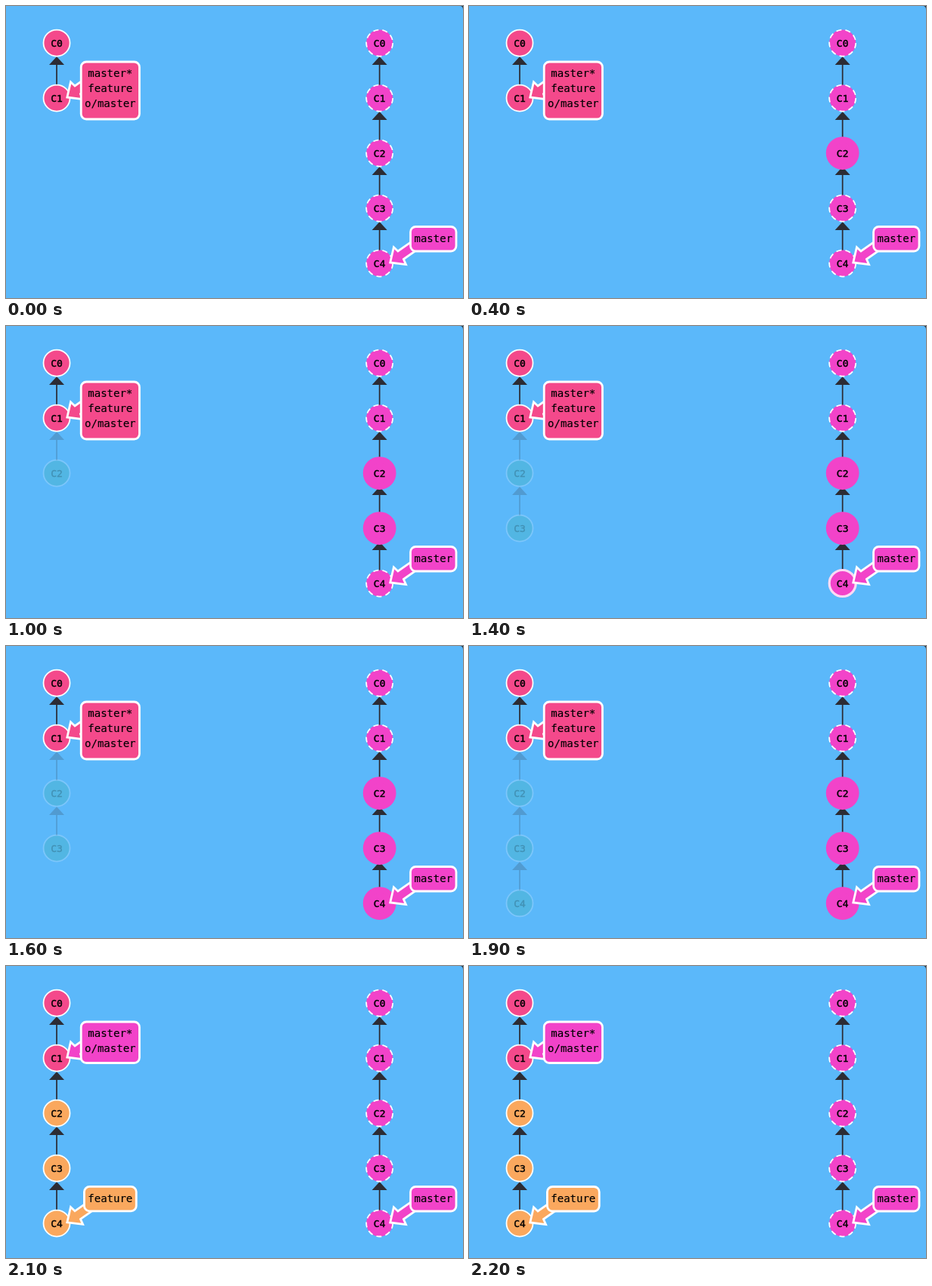
An HTML page that plays this animation: 604 px wide and 387 px high, repeating every 2.4 s.

```html
<!DOCTYPE html>
<html lang="en">
<head>
<meta charset="utf-8">
<title>Fetching commits</title>
<style>
  html, body { margin: 0; width: 100%; height: 100%; overflow: hidden; background: #5bb8fa; }
  svg { display: block; width: 604px; height: 387px; }
  text { font: 14px "DejaVu Sans Mono", "Noto Sans Mono", monospace; text-anchor: middle; stroke: #000; stroke-width: .15px; }
  .id { font-size: 13px; stroke-width: .4px; }
</style>
</head>
<body>
<svg id="stage" viewBox="0 0 604 387"></svg>
<script>
const LOOP = 2400, TICK = 100;
const LOCAL_X = 67, REMOTE_X = 493.7, ROW = 73;
const RADIUS = 17.5, THIN = 1.75, THICK = THIN * 5;
const WHITE = [255, 255, 255], PINK = [244, 73, 139], MAGENTA = [242, 67, 201],
      ORANGE = [250, 168, 94], TEAL = [50, 178, 140];

const stage = document.getElementById('stage');
const rowY = i => 49 + i * ROW;
const mix = (a, b, p) => a + (b - a) * p;
const rgb = c => `rgb(${c.map(Math.round)})`;
const blend = (a, b, p) => rgb(a.map((v, i) => mix(v, b[i], p)));
const ease = t => {
  const x = Math.min(1, Math.max(0, t));
  return x * x * (3 - 2 * x);
};

function node(x, y, name, { fill, stroke = '#fff', width = THIN, dashed = false, r = RADIUS, opacity = 1 }) {
  const dash = dashed ? `stroke-dasharray="${4 * width} ${3 * width}"` : '';
  return `<circle cx="${x}" cy="${y}" r="${r}" fill="${fill}" stroke="${stroke}"
      stroke-width="${width}" opacity="${opacity}" ${dash}/>
    <text class="id" x="${x}" y="${y + 5}" opacity="${opacity}">${name}</text>`;
}

function edge(x, childY, parentY, opacity = 1) {
  const tip = parentY + 18;
  return `<g opacity="${opacity}"><path d="M${x} ${Math.max(childY - 17, tip + 10)}V${tip + 10}"
      stroke="#2c2c34" stroke-width="${THIN}"/>
    <path d="M${x} ${tip}l10 11h-20z" fill="#2c2c34"/></g>`;
}

// A branch label: pointer, box, and the text lines as [text, y].
function label(x, nodeY, { top, width, height, fill, lines, opacity = 1 }) {
  const center = x + 70.8;
  const style = `fill="${fill}" stroke="#fff" stroke-width="2.8" opacity="${opacity}"`;
  return `<path transform="translate(${x + 13.8} ${nodeY - 1}) rotate(-35)" ${style}
      d="M0 0L15.5 -14L17 -6.5H62V6.5H17L15.5 14Z"/>
    <rect x="${center - width / 2}" y="${top}" width="${width}" height="${height}" rx="7" ${style}/>
    ${lines.map(([s, y]) => `<text x="${center}" y="${y + 5}">${s}</text>`).join('')}`;
}

function draw(ms) {
  const settle = ease((ms - 3556) / 400);
  const grow = i => ease((ms - (i - 2) * 1200) / 528);
  const birth = i => ease((ms - (i - 2) * 1200 - 756) / 400);
  let edges = '', nodes = '';

  for (let i = 0; i < 5; i++) {
    const name = 'C' + i, y = rowY(i), parentY = rowY(i - 1), fetched = i > 1;
    const glow = fetched ? grow(i) * (1 - settle) : 0;
    if (i) edges += edge(REMOTE_X, y, parentY);
    nodes += node(REMOTE_X, y, name, {
      fill: rgb(MAGENTA),
      stroke: blend(WHITE, MAGENTA, glow),
      width: mix(THIN, THICK, glow),
      dashed: glow === 0 || settle > 0
    });

    if (!fetched) {
      if (i) edges += edge(LOCAL_X, y, parentY);
      nodes += node(LOCAL_X, y, name, { fill: rgb(PINK) });
      continue;
    }
    const born = birth(i);
    if (!born) continue;
    const opacity = mix(0.2 * born, 1, settle), localY = mix(parentY, y, born);
    edges += edge(LOCAL_X, localY, parentY, opacity);
    nodes += node(LOCAL_X, localY, name, {
      fill: blend(TEAL, ORANGE, settle), r: RADIUS * born, opacity
    });
  }

  const remote = label(REMOTE_X + 0.3, rowY(4), {
    top: 292.5, width: 60.4, height: 32.5, fill: rgb(MAGENTA), lines: [['master', 308]]
  });
  const master = label(LOCAL_X, rowY(1), {
    top: 74, width: 77.2, height: mix(76, 54.5, settle), fill: blend(PINK, MAGENTA, settle),
    lines: [['master*', 89], ['o/master', mix(129, 109, settle)]]
  });
  const feature = label(LOCAL_X, mix(rowY(1), rowY(4), settle), {
    top: mix(94, 292.5, settle), width: mix(77.2, 68.8, settle), height: mix(76, 32.5, settle),
    fill: rgb(ORANGE), lines: [['feature', mix(109, 308, settle)]], opacity: settle
  });

  stage.innerHTML = `<rect width="604" height="387" fill="#5bb8fa"/>
    <path d="M600 0Q604 0 604 5V0Z" fill="#24303c"/>${edges}${nodes}${remote}${master}${feature}`;
}

let shown = null;
const start = performance.now();
function frame() {
  const tick = Math.floor(((performance.now() - start) % LOOP) / TICK);
  if (tick !== shown) {
    shown = tick;
    draw(150 + 200 * (tick - 2));
  }
  requestAnimationFrame(frame);
}
frame();
</script>
</body>
</html>
```
